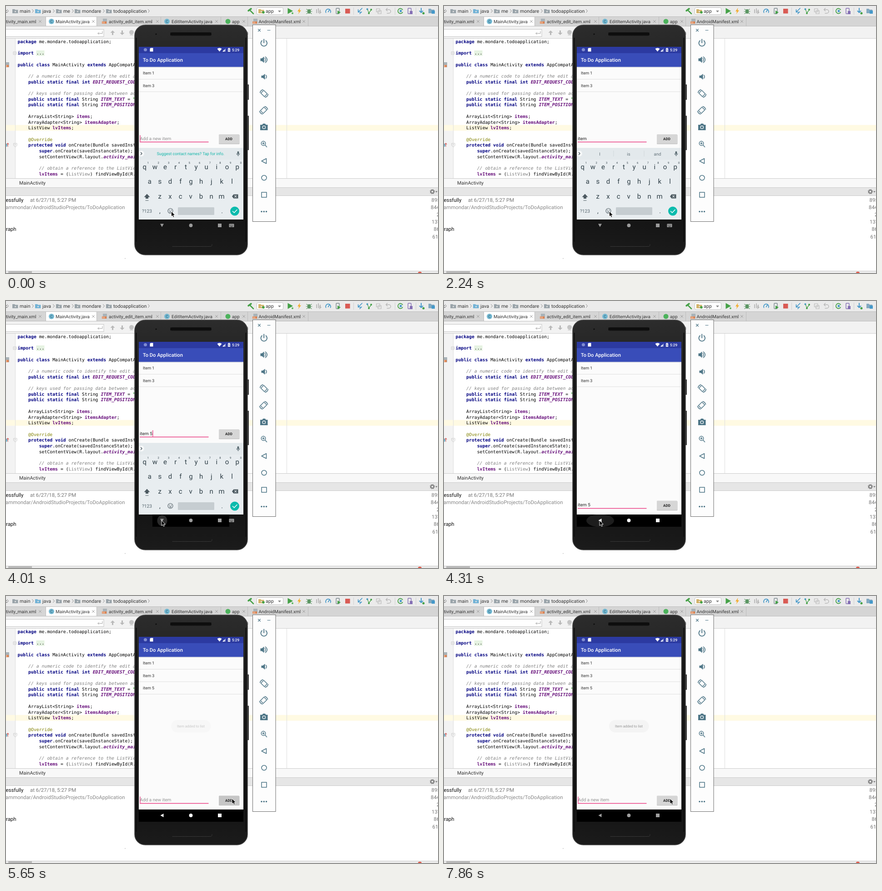
Write an HTML page that moves like this. It is 950x589 px and loops after 8000 ms.

```html
<!DOCTYPE html>
<html lang="en">
<head>
<meta charset="utf-8">
<title>To Do Application</title>
<style>
html, body { margin: 0; width: 100%; height: 100%; overflow: hidden; background: #fff; }
svg { display: block; width: 950px; height: 589px; }
text { font-family: Roboto, sans-serif; white-space: pre; text-rendering: geometricPrecision; }
.mono text { font: 9.8px "DejaVu Sans Mono", monospace; }
.kw { fill: #000080; font-weight: bold; }
.field { fill: #660e7a; font-weight: bold; }
.const { fill: #660e7a; font-weight: bold; font-style: italic; }
.note { fill: #808080; font-style: italic; }
.cast { fill: #808080; }
.anno { fill: #808000; }
.str { fill: #008000; font-weight: bold; }
.mid { text-anchor: middle; }
.line { fill: none; stroke-linecap: round; stroke-linejoin: round; }
</style>
</head>
<body>
<svg viewBox="0 0 950 589">
  <defs>
    <linearGradient id="body" x2="0" y2="1">
      <stop offset="0" stop-color="#2c2c2c"/><stop offset=".2" stop-color="#222"/>
      <stop offset=".85" stop-color="#151515"/><stop offset="1" stop-color="#1b1b1b"/>
    </linearGradient>
    <pattern id="mesh" width="3" height="3" patternUnits="userSpaceOnUse">
      <rect width="3" height="3" fill="#080808"/><circle cx="1.5" cy="1.5" r=".7" fill="#2a2a2a"/>
    </pattern>
    <clipPath id="screen"><rect x="292" y="90" width="230" height="381"/></clipPath>
    <clipPath id="navClip"><rect x="292" y="471" width="230" height="27"/></clipPath>
  </defs>

  <!-- editor panes -->
  <rect width="950" height="23" fill="#ebebeb"/>
  <rect y="23" width="950" height="21" fill="#d5d5d5"/>
  <rect x="87" y="24" width="112" height="20" fill="#fff"/>
  <path d="M0 23.5H950M0 44.5H950M87.5 24V44M199.5 24V44M340.5 24V44M472.5 24V44M531.5 24V44M664.5 24V44" stroke="#bdbdbd"/>
  <rect y="45" width="950" height="27" fill="#f2f2f2"/>
  <rect x="-2" y="51.500" width="217" height="16" fill="#fff" stroke="#c4c4c4"/>
  <path d="M0 71.500H950" stroke="#cfcfcf"/>
  <rect y="72" width="20" height="308" fill="#f3f3f3"/>
  <rect y="262.500" width="950" height="12.700" fill="#fffae3"/>
  <path d="M617.500 72V380M20.500 72V380" stroke="#dedede"/>
  <rect x="66.500" y="98" width="18" height="12" fill="#e6f3e2"/>
  <g id="code" class="mono"></g>
  <rect y="380" width="950" height="20" fill="#f8f8f8"/>
  <rect y="400" width="950" height="18" fill="#e6e6e6"/>
  <path d="M0 380.500H950M0 400.500H950M0 418.500H950" stroke="#cbcbcb"/>
  <rect y="584" width="950" height="5" fill="#ebebeb"/>
  <path d="M0 584.500H950" stroke="#cdcdcd"/>
  <rect x="5" y="585" width="52" height="4" fill="#b9b9b9"/>
  <path d="M906 589a4 3 0 0 1 8 0z" fill="#dd5a4b"/>
  <circle cx="262" cy="557" r=".7" fill="#888"/>
  <g id="labels"></g>
  <g id="toolbar"></g>

  <!-- phone -->
  <rect x="530" y="173" width="4" height="34" rx="1" fill="#333"/>
  <rect x="530" y="242" width="4" height="76" rx="1" fill="#333"/>
  <rect x="283" y="42" width="248" height="507" rx="23" fill="url(#body)" stroke="#424242" stroke-width="1.500"/>
  <path d="M286.500 70V520M527.500 70V520" stroke="#0c0c0c" stroke-width="2"/>
  <rect x="361" y="58" width="91" height="7.500" rx="3.500" fill="url(#mesh)"/>
  <circle cx="330" cy="62" r="1.500" fill="#0b0b0b"/>
  <path d="M366 530.500H450Q453 530.500 453 526" class="line" stroke="#383838"/>

  <g clip-path="url(#screen)">
    <rect x="292" y="90" width="230" height="381" fill="#fbfbfb"/>
    <rect x="292" y="90" width="230" height="14" fill="#2c3aa1"/>
    <rect x="292" y="104" width="230" height="30.500" fill="#394db9"/>
    <path d="M292 135H522" stroke="#c9cbd4"/>
    <circle cx="306.500" cy="96.500" r="3.600" fill="#7f8bd0"/>
    <path d="M318 92.500H323.500V100.500H316.500V94z" fill="#fff"/>
    <path d="M464.500 94.500Q469.500 90.500 474.500 94.500L469.500 100.500z" fill="#fff"/>
    <path d="M476 100.500H483V93.500z" fill="#98a1d6"/><path d="M476 100.500H480.500V96z" fill="#fff"/>
    <path d="M488 93.500H489.300V92.500H491.700V93.500H493V101H488z" fill="#fff"/>
    <path d="M490.800 94.500 489.500 97.500H491.500L490.200 100" class="line" stroke="#2c3aa1" stroke-width=".8"/>
    <text x="497" y="99.800" font-size="8.200" font-weight="500" fill="#fff">5:29</text>
    <text x="301" y="123" font-size="11.200" font-weight="500" fill="#fff">To Do Application</text>
    <g font-size="9" fill="#2d2d2d">
      <text x="301" y="151.200">Item 1</text>
      <text x="301" y="178.700">Item 3</text>
      <path d="M292 161.500H522M292 189H522" stroke="#dedede"/>
      <g id="added"><text x="301" y="206.200">item 5</text><path d="M292 216.500H522" stroke="#dedede"/></g>
    </g>
    <g id="entry">
      <text id="hint" x="294.500" y="295.500" font-size="10" fill="#929292">Add a new item</text>
      <text id="typed" x="294" y="295.500" font-size="10" fill="#222"></text>
      <path d="M294 300H445.500" stroke="#ea3c82" stroke-width="1.400"/>
      <rect id="caret" y="285" width="1.300" height="14" fill="#ea3c82"/>
      <rect x="468" y="283.800" width="45.500" height="21" rx="1.500" fill="#c2c2c2"/>
      <rect id="button" x="468" y="283" width="45" height="20.500" rx="1.500"/>
      <text x="490" y="296" font-size="8" font-weight="700" fill="#222" class="mid">ADD</text>
    </g>
    <g id="toast">
      <rect x="363" y="273.500" width="87.500" height="27.500" rx="13.700" fill="#eee"/>
      <text x="406.500" y="290" font-size="7.900" fill="#333" class="mid">Item added to list</text>
    </g>
    <g id="keyboard">
      <rect x="292" y="313" width="230" height="159" fill="#e8edf0"/>
      <rect x="292" y="313" width="230" height="26" fill="#e3e9ec"/>
      <circle cx="297.500" cy="325.500" r="6.500" fill="#f7f9fa"/>
      <path d="M296.500 323 299 325.500 296.500 328" class="line" stroke="#37474f" stroke-width="1.200"/>
      <rect x="508.700" y="320.500" width="3.600" height="7" rx="1.800" fill="#55666e"/>
      <path d="M507 325.500a3.500 3.500 0 0 0 7 0M510.500 329V331" class="line" stroke="#55666e"/>
      <text id="tip" x="406" y="329" font-size="8.950" fill="#10b5a8" class="mid">Suggest contact names? Tap for info.</text>
      <g id="words" font-size="9.600" fill="#63727a" class="mid">
        <text x="342.500" y="329.500">I</text><text x="406" y="329.500">is</text><text x="469.500" y="329.500">and</text>
        <path d="M373 319V332M440 319V332" stroke="#d0d7da"/>
      </g>
      <g id="keys" fill="#2f3f47" class="mid"></g>
      <path d="M310 414.500 316.500 421.500H313V425H307V421.500H303.500z" fill="#4d5a61"/>
      <path d="M306.500 429H313.500" stroke="#4d5a61"/>
      <path d="M497 420 500.500 415.500H510.500V424.500H500.500z" fill="#4d5a61"/>
      <path d="M502.500 417.700 507 422.300M507 417.700 502.500 422.300" stroke="#e8edf0" stroke-width="1.100"/>
      <circle cx="361.500" cy="452" r="5.500" class="line" stroke="#4d5a61" stroke-width="1.100"/>
      <path d="M358.500 453.500Q361.500 457.500 364.500 453.500z" fill="#4d5a61"/>
      <circle cx="359.500" cy="450.500" r=".9" fill="#4d5a61"/><circle cx="363.500" cy="450.500" r=".9" fill="#4d5a61"/>
      <rect x="378" y="444" width="80" height="17" rx="1.500" fill="#c6cdd1"/>
      <circle cx="503" cy="452.500" r="10" fill="#0abbad"/>
      <path d="M498.500 452.700 501.800 456 508 449.500" class="line" stroke="#fff" stroke-width="1.500"/>
    </g>
  </g>

  <g clip-path="url(#navClip)">
    <rect id="navBack" y="471" height="27" fill="#000"/>
    <ellipse id="ripple" cx="343.500" cy="484.500"/>
    <g id="navIcons">
      <path id="back" d="M339.500 484 346.500 480V488z"/>
      <circle cx="406.500" cy="484" r="3.900"/>
      <rect x="466" y="480" width="8" height="8"/>
    </g>
    <g id="imeIcon">
      <rect x="490.500" y="480.500" width="11" height="7.500" rx="1" fill="#9b9b9b"/>
      <path d="M492 483H500M492 485H500" stroke="#222" stroke-dasharray="1 1"/><path d="M493.500 486.800H498.500" stroke="#222"/>
    </g>
  </g>

  <!-- emulator panel -->
  <rect x="542.500" y="41.500" width="50.500" height="434" fill="#fdfdfd" stroke="#6a6a6a"/>
  <g class="line" stroke="#4d7586" stroke-width="1.500">
    <path d="M554.500 51 559.500 56M559.500 51 554.500 56M575 53.500H581" stroke-width="1.100"/>
    <path d="M563 76.500A6.800 6.800 0 1 0 571.500 76.500M567.200 73.500V81" stroke-width="1.900"/>
    <path d="M569.500 115Q572 118.500 569.500 122M570.500 112Q578 118.500 570.500 125"/>
    <path d="M571.500 152.500Q574.500 156 571.500 159.500"/>
    <g id="turn"><rect x="562" y="188.500" width="11" height="9" transform="rotate(45 567.500 193)"/><path d="M558.500 191A10 10 0 0 1 565 184.500M576.500 195A10 10 0 0 1 570 201.500"/></g>
    <use href="#turn" transform="translate(1134 37) scale(-1 1)"/>
    <circle cx="566" cy="303" r="4.700"/><path d="M569.500 306.500 573.500 311M564 303H568M566 301V305"/>
    <path d="M562 342 572.500 336.500V347.500z"/><circle cx="567.500" cy="379" r="5.500"/><rect x="562" y="411" width="11" height="11"/>
  </g>
  <g fill="#4d7586">
    <path d="M559.500 115.500H563L567.500 111.500V125.500L563 121.500H559.500zM561.500 153.500H565L569.500 149.500V162.500L565 158.500H561.500z"/>
    <path d="M560 262H563.500L565 259.500H570L571.500 262H575.500V274H559V262z"/>
    <circle cx="567.300" cy="267.500" r="3.200" fill="none" stroke="#fff" stroke-width="1.300"/>
    <circle cx="562" cy="453.500" r="1.700"/><circle cx="567.300" cy="453.500" r="1.700"/><circle cx="572.500" cy="453.500" r="1.700"/>
  </g>

  <path id="mouse" d="M0 0V11.500L2.600 9.200 4.500 13.300 6.500 12.400 4.700 8.500H8.300z" fill="#000" stroke="#fff" stroke-width=".9"/>
</svg>

<script>
const $ = id => document.getElementById(id);
const label = (x, y, str, size, fill = '#333', extra = '') =>
  `<text x="${x}" y="${y + size * .355}" font-size="${size}" fill="${fill}" ${extra}>${str}</text>`;
const stroke = (d, color, width = 1.2) => `<path d="${d}" class="line" stroke="${color}" stroke-width="${width}"/>`;
const fill = (d, color) => `<path d="${d}" fill="${color}"/>`;
const dot = (x, y, r, color) => `<circle cx="${x}" cy="${y}" r="${r}" fill="${color}"/>`;

const code = [
  'package me.mondare.todoapplication;', '', 'import ...', '',
  'public class MainActivity extends AppCompatActivity {', '',
  '    // a numeric code to identify the edit activity',
  '    public static final int EDIT_REQUEST_CODE = 20;', '',
  '    // keys used for passing data between activities',
  '    public static final String ITEM_TEXT = "itemText";',
  '    public static final String ITEM_POSITION = "itemPosition";', '',
  '    ArrayList<String> items;', '    ArrayAdapter<String> itemsAdapter;', '    ListView lvItems;', '',
  '    @Override', '    protected void onCreate(Bundle savedInstanceState) {',
  '        super.onCreate(savedInstanceState);',
  '        setContentView(R.layout.activity_main);', '',
  '        // obtain a reference to the ListView',
  '        lvItems = (ListView) findViewById(R.id.lvItems);'
];
const rules = [
  ['note', '//.*'], ['str', '"[^"]*"'],
  ['kw', '\\b(?:package|import|public|class|extends|static|final|int|protected|void|super)\\b'],
  ['const', '\\b(?:[A-Z]+_[A-Z_]+|activity_main)\\b'], ['field', '\\b(?:lvItems|itemsAdapter|items)\\b'],
  ['anno', '@\\w+'], ['cast', '(?<=\\()ListView(?=\\) )']
];
const lexer = new RegExp(rules.map(([name, re]) => `(?<${name}>${re})`).join('|'), 'g');
const paint = str => str.replace(lexer, (m, ...rest) => {
  const groups = rest.at(-1);
  return `<tspan class="${Object.keys(groups).find(k => groups[k])}">${m}</tspan>`;
}).replace(/<String>/g, '&lt;String&gt;');
$('code').innerHTML = code.map((str, i) => `<text x="25.5" y="${81.7 + i * 12.7}">${paint(str)}</text>`).join('');

const folder = (x, color) => fill(`M${x} 7H${x + 5}L${x + 6.500} 8.500H${x + 12.500}V16H${x}z`, color) + dot(x + 6.500, 12.300, 1.500, '#e4e4e4');
const chevron = x => stroke(`M${x - 1.500} 7.500 ${x + 1.500} 11 ${x - 1.500} 14.500`, '#8c8c8c', 1);
const cross = x => stroke(`M${x - 2.500} 31.500 ${x + 2.500} 36.500M${x + 2.500} 31.500 ${x - 2.500} 36.500`, '#9c9c9c', 1);
const classIcon = x => dot(x, 34, 6, '#75b9d2') + label(x, 34, 'C', 8.500, '#245a70', 'class="mid"');
const xmlIcon = (x, y) => fill(`M${x - 4} ${y - 6}H${x + 5}V${y + 5}H${x - 4}z`, '#a9b3b8') +
  `<rect x="${x - 6}" y="${y}" width="10" height="5" fill="#dd8554"/>` + stroke(`M${x - 4} ${y + 1}V${y + 4}M${x - 1} ${y + 1}V${y + 4}`, '#fff', .8);

const crumbs = [[30, 'main'], [80, 'java'], [126, 'me'], [167, 'mondare'], [236, 'todoapplication']];
const tabs = [[0, 'tivity_main.xml'], [109, 'MainActivity.java'], [226, 'activity_edit_item.xml'],
  [364, 'EditItemActivity.java'], [497, 'app'], [555.500, 'AndroidManifest.xml']];
const sizes = [[935.500, '895'], [934, '844'], [947, '24'], [936, '137'], [940.500, '86'], [937.500, '61']];
$('labels').innerHTML =
  label(-3, 11, 'c', 10.600) + [4, 59, 105, 147, 215, 314].map(chevron).join('') +
  crumbs.map(([x, s]) => folder(x - 16, s == 'java' ? '#74b3d6' : '#9aa4aa') + label(x, 11, s, 10.600)).join('') +
  tabs.map(([x, s]) => label(x, 34, s, 10)).join('') + [75, 192, 333, 463, 523, 655].map(cross).join('') +
  classIcon(100) + classIcon(354) + xmlIcon(217, 34) + xmlIcon(548, 34) + xmlIcon(2, 130) + dot(488, 34, 5.500, '#4cb25c') +
  stroke('M212 56V60.500H202M204.500 58 202 60.500 204.500 63', '#a5a5a5', 1) +
  fill('M234.500 54 239.500 59H236V64H233V59H229.500zM255.500 64 260.500 59H257V54H254V59H250.500z', '#b9b9b9') +
  dot(276, 58, 5, '#c4c4c4') + stroke('M273 64H279', '#b5b5b5') + label(527.500, 59, 's', 10.600) +
  stroke('M16.500 101H22.500V107H16.500zM18 104H21', '#c2c2c2', .8) +
  stroke('M17 303H24V308L20.500 311 17 308zM19 306H22', '#c2c2c2', .8) +
  dot(-1, 307, 4, '#78b8cf') + stroke('M4 310V303M2 305 4 302.500 6 305', '#d2504a', 1.100) +
  label(29, 390.500, 'MainActivity', 10.600) +
  label(-.5, 427.500, 'essfully', 11.400, '#111') + label(53, 427.500, 'at 6/27/18, 5:27 PM', 11.400, '#777') +
  label(-1, 443.500, 'ammondar/AndroidStudioProjects/ToDoApplication', 11.400, '#888') +
  label(0, 492, 'raph', 11.400, '#111') +
  sizes.map(([x, s], i) => label(x, 427.500 + i * 16.200, s, 11.400, '#777')).join('') +
  `<circle cx="937.5" cy="409.500" r="3.200" fill="none" stroke="#777" stroke-width="2"/>
   <circle cx="937.5" cy="409.500" r="4.800" fill="none" stroke="#777" stroke-width="1.500" stroke-dasharray="1.900 1.870"/>` +
  fill('M944 408.500H949L946.500 411.500z', '#777');

const green = '#45a147', blue = '#4598c9', grey = '#b9b9b9';
const device = (x, color) => `<rect x="${x - 4}" y="5" width="7" height="12" rx="1" fill="none" stroke="${color}" stroke-width="1.400"/>`;
$('toolbar').innerHTML =
  stroke('M537 10 544 17', green, 2.500) + stroke('M533 10.500 539 6', green, 3.500) +
  '<rect x="551.5" y="3.500" width="58" height="15.500" rx="3" fill="#fff" stroke="#c2c2c2"/>' +
  folder(555, '#d2b36b') + dot(566, 14, 2.800, green) + label(571, 11, 'app', 10.600) + fill('M598 10H605L601.500 14z', '#8a8a8a') +
  fill('M619.500 4.500 631 11 619.500 17.500z', green) + dot(630, 16, 2, '#5ab65d') +
  fill('M646.500 4 641 12H644.500L642.500 18 649 9.500H645.500z', '#f3ad2d') +
  `<ellipse cx="666.5" cy="12" rx="3.800" ry="5" fill="#5b9663"/>` + stroke('M661 7 664 9M672 7 669 9M660 12H673M661 17 664 15M672 17 669 15', '#5b9663') +
  stroke('M683 15V8M687 15V6M691 15V9', grey, 2) + fill('M689 10 694 14 689 18z', grey) +
  stroke('M703.500 14.500A5.500 5.500 0 1 1 713.500 14.500M708.500 13 711 9', blue, 1.700) +
  device(730, '#7d8a90') + fill('M729 10 736 14 729 18z', green) +
  '<rect x="746" y="6" width="10.500" height="10.500" fill="#d95b54"/>' +
  stroke('M764.500 4V19M855.500 4V19M901.500 4V19', '#cfcfcf', 1) +
  stroke('M783 5 775 13M774.500 8V13.500H780M778 17 782 13', blue, 1.700) +
  dot(794.500, 7, 2, blue) + dot(803, 8, 2, green) + dot(798, 16, 2, green) + stroke('M795 8 798 15 803 9', green) +
  stroke('M814.500 6H822V13H814.500zM818 10H825V17H818z', grey) +
  stroke('M836 8H842A3.800 3.800 0 0 1 842 16H838M838.500 5 835.500 8 838.500 11', grey, 1.500) +
  stroke('M872 8A5.500 5.500 0 1 0 872 14', green, 1.800) + dot(868, 11, 2.500, blue) +
  device(888, '#8570b5') + fill('M888 11H894V18H888z', '#8570b5') +
  stroke('M913 5V14M909.500 11 913 14.500 916.500 11', blue, 2) + dot(918, 16, 2.500, green) +
  fill('M929 6H934L936 8H942V16H929z', '#83a9c0') + fill('M936 10H943V17H936z', blue);

// A key row spaced evenly from its first key.
const keyRow = (chars, x0, y) => [...chars].map((c, i) => `<text x="${x0 + i * 22.65}" y="${y}" font-size="15">${c}</text>`).join('');
$('keys').innerHTML = keyRow('qwertyuiop', 304.800, 359.500) + keyRow('asdfghjkl', 315.800, 391.500) + keyRow('zxcvbnm', 338.300, 425) +
  [...'1234567890'].map((c, i) => `<text x="${312.5 + i * 22.65}" y="348" font-size="6">${c}</text>`).join('') +
  label(310, 452, '?123', 10.300, '#56666e') + '<text x="338.5" y="457" font-size="14">,</text><text x="475" y="457" font-size="14">.</text>';

const steps = {
  caret: [[0, 1], [150, 0], [450, 1], [2240, 0], [2680, 1], [3130, 0], [3570, 1], [4160, 0], [4750, 1],
    [5200, 0], [5650, 1], [6100, 0], [6690, 1], [7120, 0], [7570, 1]],
  typed: [[0, ''], [750, 'i'], [1050, 'it'], [1200, 'ite'], [1340, 'item'], [1490, 'item '], [2680, 'item 5'], [5650, '']],
  bar: [[0, 'tip'], [1050, ''], [1490, 'words'], [2680, '']],
  mouse: [[0, [363.500, 453]], [3130, [379, 477]], [3280, [360, 477]], [3570, [342, 484]], [4750, [410, 471]],
    [4900, [485, 455]], [5050, [525, 449]], [5200, [503, 448]], [5500, [497, 447]]],
  slide: [[0, 0], [4160, 80], [4310, 160]],
  ripple: [[0, [0, 0, '#000']], [3860, [7, 7, '#2c2c2c']], [4010, [11, 12, '#2c2c2c']], [4160, [22, 13, '#252525']],
    [4310, [30.500, 14, '#1d1d1d']], [4460, [0, 0, '#000']]],
  icons: [[0, 155], [4160, 255], [6840, 240], [6980, 225], [7120, 210], [7270, 195], [7570, 180], [7720, 170], [7860, 160]],
  button: [[0, '#d6d6d6'], [5500, '#c6c6c6'], [5800, '#cecece'], [5950, '#d6d6d6']],
  toast: [[0, 0], [5650, .25], [5800, .6], [5950, .85], [6100, 1], [7570, .85], [7720, .7], [7860, .5]]
};
const at = (name, t) => steps[name].findLast(([start]) => start <= t)[1];
const set = (id, attrs) => { for (const key in attrs) $(id).setAttribute(key, attrs[key]); };
const show = (id, on) => set(id, { visibility: on ? 'visible' : 'hidden' });

function draw(t) {
  const typed = at('typed', t), bar = at('bar', t), slide = at('slide', t);
  const [rx, ry, tint] = at('ripple', t), level = at('icons', t), opened = t < 4160;
  $('typed').textContent = typed;
  show('hint', !typed);
  set('caret', { x: 294.3 + (typed ? $('typed').getComputedTextLength() : 0) });
  show('caret', at('caret', t));
  set('entry', { transform: `translate(0 ${opened ? 0 : 157.5})` });
  set('button', { fill: at('button', t) });
  set('keyboard', { transform: `translate(0 ${slide})` });
  show('tip', bar == 'tip');
  show('words', bar == 'words');
  show('added', t >= 5650);
  set('toast', { opacity: at('toast', t) });
  set('navBack', opened ? { x: 322, width: t < 3570 ? 0 : 169 } : { x: 292, width: 230 });
  set('ripple', { rx, ry, fill: tint });
  set('navIcons', { fill: `rgb(${level},${level},${level})` });
  set('back', { transform: opened ? 'rotate(-90 343 484)' : '' });
  show('imeIcon', opened);
  set('mouse', { transform: `translate(${at('mouse', t)})` });
}

const begin = performance.now();
function tick() {
  draw((performance.now() - begin) % 8000);
  requestAnimationFrame(tick);
}
tick();
</script>
</body>
</html>
```
